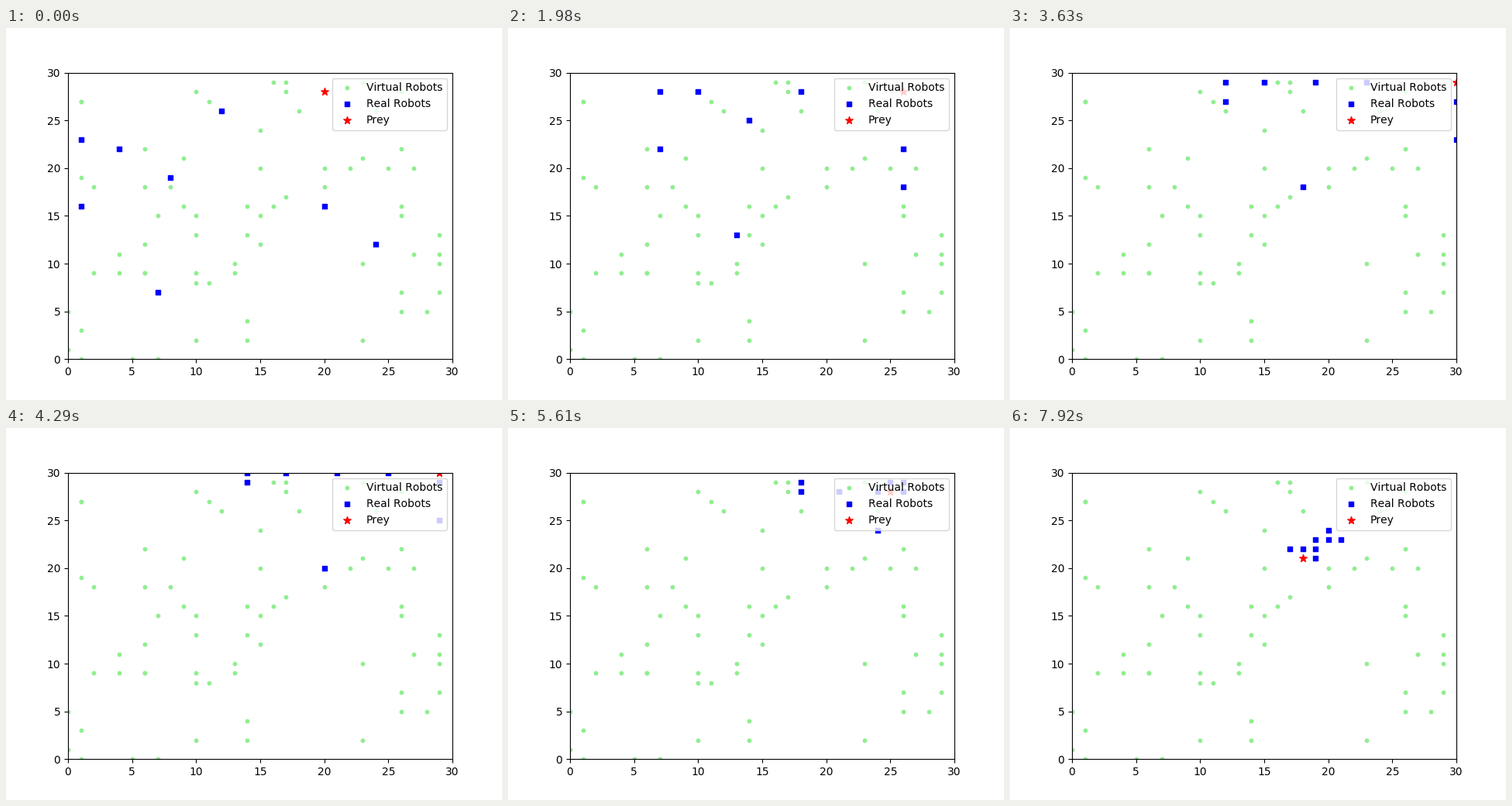
A matplotlib script for the animation above (8 s loop, 640 by 480 pixels).

```python
import numpy as np
import matplotlib.pyplot as plt
from matplotlib.animation import FuncAnimation

STEP_MS = 330
INTERVAL = 40
LOOP_MS = 8000
LAST_STEP = 24
SURROUND = 21  # from this step on the pack keeps its formation

# Idle robots: column -> rows
VIRTUAL = {
    0: [1, 5], 1: [0, 3, 19, 27, 27], 2: [9, 18], 4: [9, 11], 5: [0],
    6: [9, 9, 12, 18, 22], 7: [0, 0, 15], 8: [18], 9: [16, 21],
    10: [2, 8, 9, 13, 15, 28], 11: [8, 27], 12: [26], 13: [9, 10],
    14: [2, 4, 13, 16], 15: [12, 15, 20, 24], 16: [16, 29],
    17: [17, 28, 29], 18: [26], 20: [18, 20], 22: [20],
    23: [2, 10, 21, 29], 24: [26], 25: [20], 26: [5, 7, 15, 16, 22, 28],
    27: [11, 20], 28: [5], 29: [7, 10, 11, 13],
}

# Hunters in order of moving: start cell -> slot beside the caught prey
HUNTERS = {
    (1, 23): (0, 1), (1, 16): (-1, 1), (4, 22): (1, 1), (24, 12): (2, 2),
    (12, 26): (2, 3), (20, 16): (3, 2), (8, 19): (1, 2), (7, 7): (1, 0),
}

PREY_START = (20, 28)
PREY_LEGS = [(10, (1, 0)), (2, (0, 1)), (3, (-1, 0)), (9, (-1, -1))]

# Staying comes first, so a hunter moves only if that brings it closer
MOVES = [(0, 0)] + [(dx, dy) for dy in (1, 0, -1) for dx in (-1, 0, 1)]


def prey_track():
    moves = [move for count, move in PREY_LEGS for _ in range(count)]
    return np.cumsum([PREY_START] + moves, axis=0)


def advance(pack, target):
    """Each hunter in turn takes the free cell nearest to the target."""
    tx, ty = target
    pack = list(pack)
    for i, (x, y) in enumerate(pack):
        taken = set(pack[:i] + pack[i + 1:]) | {(tx, ty)}
        cells = [(x + dx, y + dy) for dx, dy in MOVES]
        free = [c for c in cells if c not in taken]
        pack[i] = min(free, key=lambda c: (c[0] - tx) ** 2 + (c[1] - ty) ** 2)
    return pack


def pack_track(track):
    pack = list(HUNTERS)
    history = [pack]
    for k in range(1, LAST_STEP + 1):
        x, y = map(int, track[k])
        if k < SURROUND:
            pack = advance(pack, (x, y))
        else:
            pack = [(x + dx, y + dy) for dx, dy in HUNTERS.values()]
        history.append(pack)
    return np.array(history)


prey_path = prey_track()
pack_path = pack_track(prey_path)
dots = np.array([(x, y) for x, ys in VIRTUAL.items() for y in ys])

plt.rcParams["text.kerning_factor"] = 6
fig, ax = plt.subplots(figsize=(6.4, 4.8), dpi=100)
ax.set_xlim(0, 30)
ax.set_ylim(0, 30)
ax.scatter(*dots.T, s=10, c="lightgreen", marker="o", label="Virtual Robots")
robots = ax.scatter(*pack_path[0].T, s=25, c="blue", marker="s",
                    label="Real Robots")
prey = ax.scatter(*prey_path[0], s=50, c="red", marker="*", label="Prey")
ax.legend(loc="upper right")


def update(frame):
    # A step shows in the slot where it falls due
    k = min((frame * INTERVAL + INTERVAL - 10) // STEP_MS, LAST_STEP)
    robots.set_offsets(pack_path[k])
    prey.set_offsets(prey_path[k])
    return robots, prey


anim = FuncAnimation(fig, update, frames=LOOP_MS // INTERVAL,
                     interval=INTERVAL, repeat=True, repeat_delay=0)
plt.show()
```
